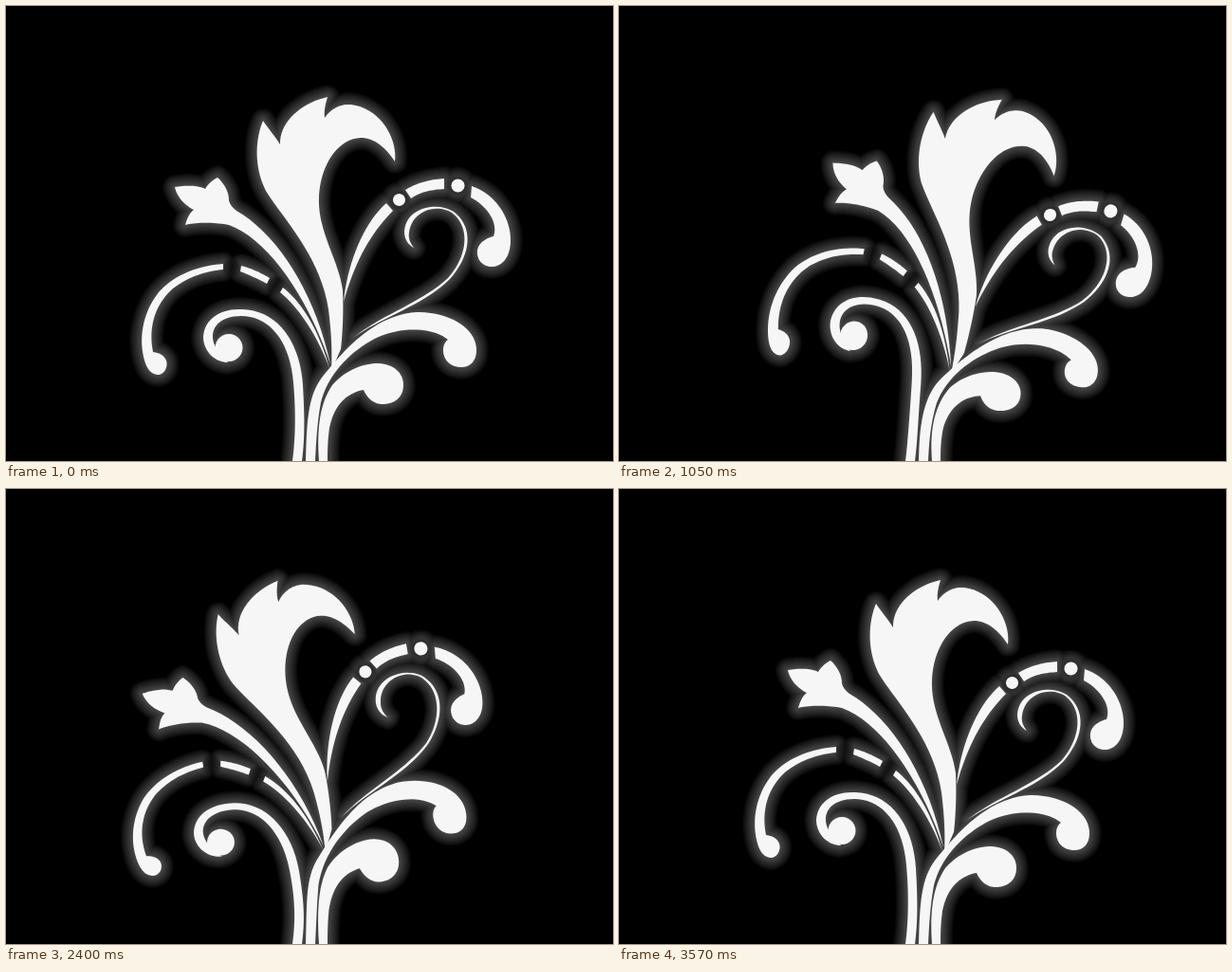
An HTML page with a canvas that plays this animation: 640x480 px, repeating every 3.6 s.

```html
<!DOCTYPE html>
<html lang="en">
<head>
<meta charset="utf-8">
<title>Swaying floral ornament</title>
<style>
  html, body { margin: 0; width: 100%; height: 100%; overflow: hidden; background: #000; }
  canvas { display: block; }
</style>
</head>
<body>
<canvas id="stage" width="640" height="480"></canvas>
<script>
const ctx = document.getElementById('stage').getContext('2d');
const LOOP = 3600, STEP = 30, GROUND = 480;
const shapes = [];

// Flattens an absolute M/L/C outline into points that can be bent.
function outline(d) {
  const points = [];
  for (const [, cmd, args] of d.matchAll(/([MLC])([^MLCZ]*)/g)) {
    const n = args.trim().split(/[\s,]+/).map(Number);
    if (cmd !== 'C') { points.push(n); continue; }
    const p = points[points.length - 1];
    for (let i = 1; i <= 18; i++) {
      const t = i / 18, u = 1 - t;
      points.push([0, 1].map(k =>
        u * u * u * p[k] + 3 * u * u * t * n[k] + 3 * u * t * t * n[k + 2] + t * t * t * n[k + 4]));
    }
  }
  shapes.push(points);
}

function disc(x, y, r) {
  const points = [];
  for (let i = 0; i < 28; i++) {
    const a = i * Math.PI / 14;
    points.push([x + r * Math.cos(a), y + r * Math.sin(a)]);
  }
  shapes.push(points);
}

// Central leaf
outline(`M271 121 C262 142 262 172 274 195 C290 222 331 262 340 320 C343 345 344 362 343 385
  L353 362 C355 345 356 320 355 300 C350 265 328 238 330 200 C332 167 350 140 374 139
  C390 139 402 152 410 164 C413 140 395 108 364 104 C352 103 342 109 336 118
  C335 110 337 103 339 96 C312 102 288 122 289 146 C284 138 277 130 271 121Z`);

// Small flower
outline(`M178 191 C190 189 202 189 210 193 C213 188 217 184 223 181 C230 187 235 196 235 205
  C236 209 238 212 243 216 C285 240 325 300 342 378 C319 309 277 246 235 231
  C220 228 200 228 189 231 C191 224 193 219 198 215 C188 210 180 201 178 191Z`);

// Left arc: bud, dash, stalk
outline(`M229 272 C200 274 176 285 161 302 C145 322 140 348 145 370 C148 383 153 389 161 389
  C167 388 171 381 169 374 C166 367 160 366 155 365 C149 335 160 312 176 298
  C193 285 210 280 229 278Z`);
outline('M248 274 C259 277 268 281 278 287 L275 293 C266 288 257 284 247 280Z');
outline('M292 297 C312 313 329 340 341 382 C330 352 311 320 289 302Z');

// Left curl
outline(`M302 480 C306 450 305 420 303 397 C299 352 277 327 248 327 C223 327 211 343 222 362
  L234 376 C220 376 208 364 208 349 C209 331 225 319 249 320 C287 321 310 355 313 400
  C315 435 315 457 312 480Z`);
disc(235, 360.5, 14.5);

// Right arc: stalk, dots, dash, drop
outline('M356 312 C360 270 378 228 401 208 L408 216 C386 238 368 268 356 312Z');
disc(414.5, 204.5, 6.5);
outline('M421 194 C434 186 448 183 462 182 L462 193 C448 194 437 196 427 203Z');
disc(476.5, 189.5, 7);
outline(`M491 190 C515 198 532 222 532 247 C532 265 523 275 512 275 C502 275 496 267 497 258
  C498 250 506 245 514 243 C519 230 509 212 490 202Z`);

// Thin spiral
outline(`M366 350 C398 327 440 316 468 288 C491 262 493 233 472 217 C452 205 421 214 420 238
  C420 246 424 252 430 255 C426 250 424 245 425 239 C427 218 452 207 470 218
  C489 232 488 262 466 287 C438 313 397 325 366 350Z`);

// Lower right branches
outline(`M316 480 C317 440 318 412 333 392 C344 378 362 356 384 341 C400 330 418 323 436 323
  C472 324 496 342 496 363 C496 374 490 381 480 381 C468 381 461 373 461 363
  C461 358 463 354 466 352 C450 339 419 338 393 349 C367 361 340 386 332 418
  C328 440 327 460 326 480Z`);
outline(`M330 480 C327 440 333 416 344 400 C356 386 374 377 393 377 C410 378 419 388 419 400
  C419 413 409 420 397 420 C388 420 381 414 377 405 C360 408 346 420 341 445
  C339 460 339 470 339 480Z`);

const gaps = [[414.5, 204.5], [476.5, 189.5], [238, 277], [284, 295]];

function swayAt(t) {
  const phase = t < 1800 ? Math.PI * t / 1800 : Math.PI * (1 + Math.min(1, (t - 1800) / 1770));
  return Math.sin(phase) - 0.045 * Math.sin(3 * phase);
}

// Bends a point around the stem; the angle grows with height and levels off.
function bend([x, y], s) {
  const h = Math.max(0, GROUND - y), rise = h / 60;
  const side = x - (323 + h * 0.03), angle = 0.208 * rise * rise / (1 + rise * rise);
  return [
    x + s * 0.208 * (h - 60 * Math.atan(rise)) + s * s * (h * h / 55000 - 0.5 * angle * angle * side),
    y + s * 0.88 * angle * side + s * s * h / 190
  ];
}

function trace(points) {
  const path = new Path2D();
  points.forEach(([x, y]) => path.lineTo(x, y));
  path.closePath();
  return path;
}

function draw(s) {
  ctx.fillStyle = '#000';
  ctx.fillRect(0, 0, 640, 480);
  const paths = shapes.map(points => trace(points.map(p => bend(p, s))));
  const all = new Path2D();
  paths.forEach(p => all.addPath(p));

  ctx.lineJoin = 'round';
  for (let r = 13; r >= 1; r--) {
    const level = Math.round(74 * Math.pow(1 - r / 14, 0.85));
    ctx.strokeStyle = `rgb(${level},${level},${level})`;
    ctx.lineWidth = 2 * r;
    ctx.stroke(all);
  }

  for (const gap of gaps) {
    const [x, y] = bend(gap, s), r = 12;
    const shade = ctx.createRadialGradient(x, y, 0, x, y, r);
    shade.addColorStop(0, 'rgba(0,0,0,0.45)');
    shade.addColorStop(0.6, 'rgba(0,0,0,0.35)');
    shade.addColorStop(1, 'rgba(0,0,0,0)');
    ctx.fillStyle = shade;
    ctx.fillRect(x - r, y - r, 2 * r, 2 * r);
  }

  ctx.fillStyle = '#f6f6f6';
  paths.forEach(p => ctx.fill(p));
}

const start = performance.now();
function frame() {
  const t = (performance.now() - start) % LOOP;
  draw(swayAt(Math.floor(t / STEP) * STEP));
  requestAnimationFrame(frame);
}
frame();
</script>
</body>
</html>
```
